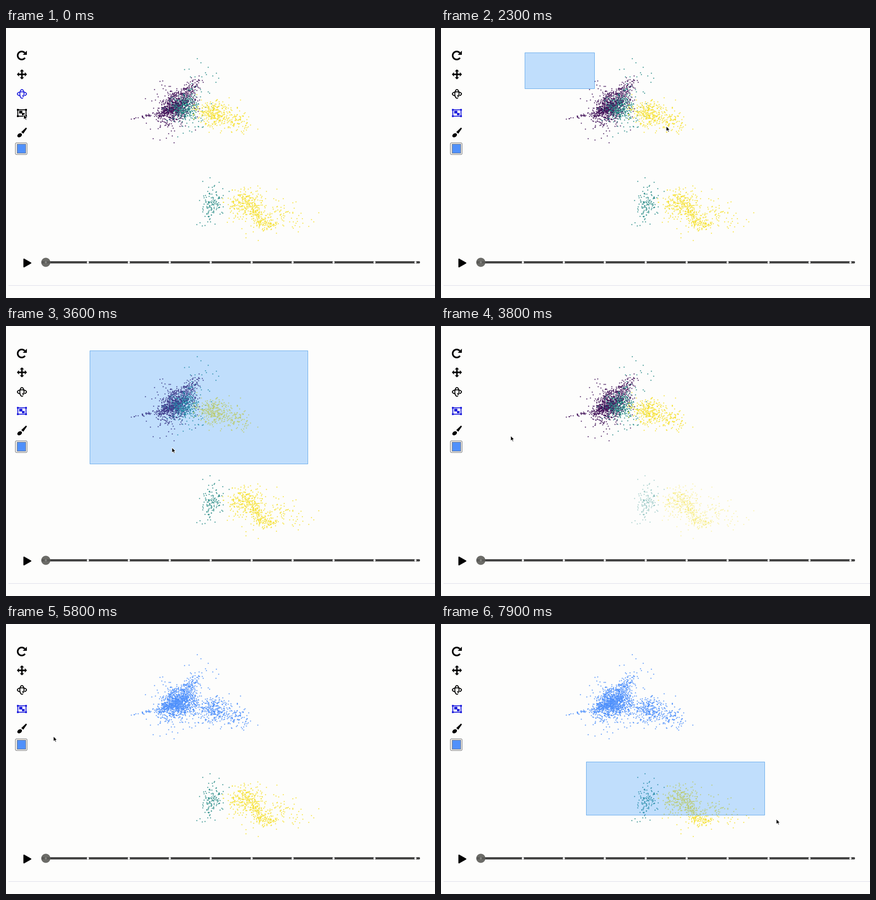
Write a matplotlib script that moves like this. It is 943 by 594 pixels and loops after 8 s.

```python
import numpy as np
import matplotlib.pyplot as plt
from matplotlib.animation import FuncAnimation
from matplotlib.patches import Circle, Ellipse, FancyBboxPatch, Polygon, Rectangle

W, H, DPI = 943, 594, 64
PX = 72 / DPI  # one pixel in points
STEP, FRAMES = 100, 80

PAPER, INK, ACTIVE, HOVER = "#fdfdfc", "#000000", "#2222dd", "#333333"
PURPLE, TEAL, YELLOW, PAINT = "#3c0a54", "#1f8782", "#f6e12c", "#4c8ffb"

plt.rcParams["path.snap"] = False
rng = np.random.default_rng(12)
fig = plt.figure(figsize=(W / DPI, H / DPI), dpi=DPI, facecolor=PAPER)
ax = fig.add_axes([0, 0, 1, 1])
ax.set_xlim(0, W)
ax.set_ylim(H, 0)
ax.axis("off")


# ---- drawing helpers ----
def add(patch):
    return ax.add_patch(patch)


def fill(points, color=INK, **kw):
    return add(Polygon(points, closed=True, fc=color, ec=color, lw=0, **kw))


def box(x0, y0, x1, y1, color=INK, **kw):
    return add(Rectangle((x0, y0), x1 - x0, y1 - y0, fc=color, ec=color, lw=0, **kw))


def disc(x, y, r, color):
    return add(Circle((x, y), r, fc=color, ec="none", zorder=3))


def arc(cx, cy, rx, ry, a0, a1, width):
    a = np.radians(np.linspace(a0, a1, 60))
    return ax.plot(cx + rx * np.cos(a), cy + ry * np.sin(a), color=INK,
                   lw=width * PX, solid_capstyle="butt")[0]


def rounded(x0, y0, x1, y1, r, **kw):
    style = f"round,pad=0,rounding_size={r}"
    return add(FancyBboxPatch((x0, y0), x1 - x0, y1 - y0, boxstyle=style, **kw))


def tint(parts, color):
    for part in parts:
        part.set_color(color)


# ---- point clouds ----
def cloud(n, cx, cy, sx, sy, turn=0):
    """Rotated Gaussian blob with its far tail cut off."""
    r = np.sqrt(-2 * np.log(rng.uniform(0.03, 1, n)))
    a = rng.uniform(0, 2 * np.pi, n)
    u, v = sx * r * np.cos(a), sy * r * np.sin(a)
    c, s = np.cos(np.radians(turn)), np.sin(np.radians(turn))
    return np.column_stack([cx + u * c - v * s, cy + u * s + v * c])


def dots(color, *clouds):
    x, y = np.round(np.vstack(clouds)).T
    return ax.scatter(x, y, s=(2 * PX) ** 2, marker="s", c=color, linewidths=0, zorder=2)


upper = [
    dots(PURPLE,
         cloud(620, 374, 172, 20, 14, -35),
         cloud(130, 402, 136, 17, 8, -48),
         cloud(110, 352, 183, 13, 6, -8),
         cloud(26, 304, 194, 17, 1.5, -13),
         cloud(120, 358, 185, 27, 34)),
    dots(TEAL,
         cloud(230, 389, 176, 12, 15, -50),
         cloud(45, 405, 158, 7, 14, 10),
         cloud(60, 400, 188, 28, 27),
         cloud(16, 440, 106, 25, 17)),
    dots(YELLOW,
         cloud(250, 456, 189, 20, 13, 8),
         cloud(70, 470, 187, 27, 18, 15),
         cloud(75, 512, 210, 17, 11, 20)),
]
lower = [
    dots(TEAL,
         cloud(80, 451, 386, 11, 16, 20),
         cloud(45, 451, 386, 18, 24)),
    dots(YELLOW,
         cloud(180, 522, 385, 19, 14, 10),
         cloud(120, 549, 407, 22, 8, 50),
         cloud(60, 572, 432, 15, 6),
         cloud(90, 538, 400, 30, 25, 20),
         cloud(75, 614, 408, 31, 22, 20)),
]

# ---- tool icons ----
redo = [arc(34.5, 60.5, 8.8, 8.8, 35, 318, 3.6), fill([(45.8, 50), (45.8, 59), (37, 59)])]

move = [box(33.4, 94, 36.6, 110), box(27, 100.4, 43, 103.6)]
for d in np.array([(1, 0), (-1, 0), (0, 1), (0, -1)]):
    base, side = (35, 102) + 6.5 * d, 4.8 * d[::-1]
    move.append(fill([base + side, base - side, (35, 102) + 11 * d]))

orbit = [
    arc(35, 145, 4.6, 9.6, 60, 375, 2),
    arc(35, 145, 10, 4.6, -245, 60, 2),
    fill([(35, 149.5), (39, 146.5), (39, 152.5)]),
]

group = [box(25, y, 45, y + 2) for y in (179, 193)] + [box(x, 179, x + 2, 195) for x in (25, 43)]
group += [box(x, y, x + 4, y + 4) for x in (24, 42) for y in (178, 192)]
group += [box(29, 182, 36, 188), box(35, 187, 41, 192)]

brush = [
    fill([(44, 219), (46, 221), (38, 232.5), (33.5, 229)]),
    add(Ellipse((30, 236), 11, 8, angle=-35, fc=INK, lw=0)),
]

rounded(20.5, 252.5, 46.5, 278.5, 3, fc="#efefef", ec="#767676", lw=PX)
add(Rectangle((24.5, 255.5), 19, 20, fc="#5090fb", ec="#777777", lw=PX))

# ---- timeline ----
add(Polygon([(39.5, 508.5), (54.5, 517), (39.5, 525.5)], closed=True, fc=INK, ec=INK,
            lw=2.5 * PX, joinstyle="round"))
rounded(78, 513, 910, 518, 2, fc="#444444", lw=0)
for x in np.linspace(180, 900, 9):
    disc(x, 515.5, 2.4, "white")
disc(87.5, 515.5, 10, "#6c6c68")
box(78, 513, 97, 518, "#5a5a57", zorder=3)
disc(87.5, 515.5, 2.4, "#83837f")
ax.plot([6, W], [566.5, 566.5], color="#b9b9d4", lw=PX, ls=(0, (1, 1)))

# ---- selection box and pointers ----
marquee = add(Rectangle((0, 0), 1, 1, fc=(0.2, 0.6, 1, 0.3), ec="#5fa6ea", lw=PX, zorder=4))

ARROW = np.array([(0, 0), (0, 11.5), (2.7, 9), (4.6, 13), (6.4, 12.2), (4.7, 8.3), (8.2, 8.2)])
HAND = np.array([(-1, 0), (1, 0), (1, 5), (7.5, 6.5), (6.5, 14), (0, 14), (-3.5, 9), (-1, 9)])
arrow = add(Polygon(ARROW, closed=True, fc="black", ec="white", lw=PX, zorder=6))
hand = add(Polygon(HAND, closed=True, fc="white", ec="black", lw=PX, zorder=6))

GROUP_BTN, BRUSH_BTN = np.array((39, 190)), np.array((43, 228))
DRAGS = [((184, 54), (664, 304)), ((319, 303), (737, 429))]
MOVES = [  # start ms, end ms, destination
    (700, 1800, DRAGS[0][0]),
    (2030, 2480, DRAGS[0][1]),
    (3200, 4020, BRUSH_BTN),
    (5400, 6600, (279, 301)),
    (6750, 7200, DRAGS[1][0]),
    (7400, 7870, DRAGS[1][1]),
]


def pointer(t):
    pos = GROUP_BTN.astype(float)
    for start, end, goal in MOVES:
        u = np.clip((t - start) / (end - start), 0, 1)
        pos += (np.array(goal) - pos) * u * u * (3 - 2 * u)
    return pos


def draw(i):
    t = i * STEP
    pos = pointer(t)

    over_group = 100 <= t <= 700
    over_brush = 4000 <= t <= 5400
    hand.set_visible(over_group or over_brush)
    arrow.set_visible(not (over_group or over_brush))
    hand.set_xy(HAND + pos)
    arrow.set_xy(ARROW + pos)

    selecting = t >= 400
    tint(orbit, INK if selecting else ACTIVE)
    tint(group, ACTIVE if selecting else HOVER if over_group else INK)
    tint(brush, HOVER if over_brush else INK)

    # the box trails the pointer by one step
    first, second = 2200 <= t < 3700, t >= 7500
    marquee.set_visible(first or second)
    if first or second:
        x0, y0 = DRAGS[int(second)][0]
        x1, y1 = np.round(pointer(min(t - STEP, 3000) if first else t - STEP))
        marquee.set_bounds(x0 + 0.5, y0 + 0.5, x1 - x0 - 1, y1 - y0 - 1)

    painted = t >= 5100
    for pts, color in zip(upper, (PURPLE, TEAL, YELLOW)):
        pts.set_facecolor(PAINT if painted else color)
    dimmed = 3700 <= t < 5800
    for pts in lower:
        pts.set_alpha(0.42 if dimmed else 1)
    return []


anim = FuncAnimation(fig, draw, frames=FRAMES, interval=STEP, repeat=True, repeat_delay=0, blit=False)
plt.show()
```
